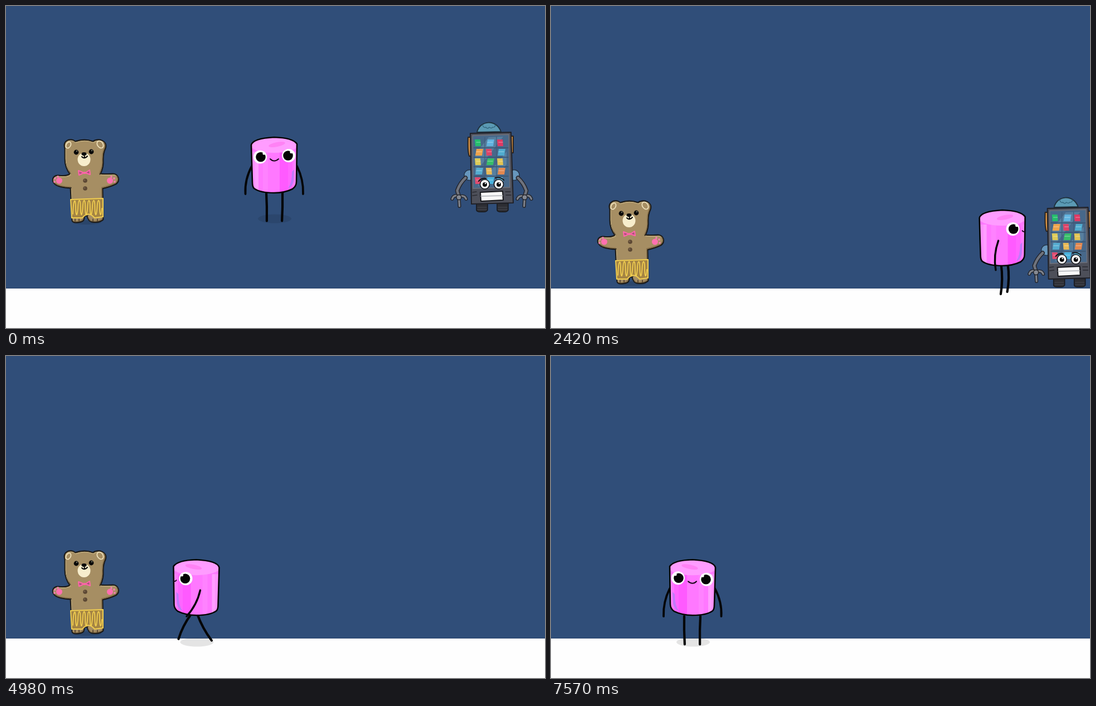
An HTML page with a canvas for the animation above (7.77 s loop, 967x579 px).

```html
<!DOCTYPE html>
<html>
<head>
<meta charset="utf-8">
<style>
  html, body { margin: 0; width: 967px; height: 579px; overflow: hidden; background: #304e79; }
  canvas { display: block; }
</style>
</head>
<body>
<canvas id="stage" width="967" height="579"></canvas>
<script>
const ctx = document.getElementById('stage').getContext('2d');
const LOOP = 7770, FLOOR = 508, GRAVITY = 568, FALL_START = 185;

// [time in ms, x] along the floor
const heroKeys = [[1691, 481], [2844, 1000], [3260, 1000], [4277, 542], [4406, 600], [5100, 288],
  [5445, 168], [5663, 266], [6000, 266], [6636, -20], [7325, 290], [7405, 254]];
const robotKeys = [[2293, 870], [2844, 1118]];
const bearKeys = [[5226, 141], [5445, 65], [6218, 65], [6636, -123]];

function follow(keys, t) {
  let dir = 1;
  if (t <= keys[0][0]) return { x: keys[0][1], dir, moving: false };
  for (let i = 1; i < keys.length; i++) {
    const [t0, x0] = keys[i - 1], [t1, x1] = keys[i];
    if (x1 !== x0) dir = Math.sign(x1 - x0);
    if (t < t1) return { x: x0 + (x1 - x0) * (t - t0) / (t1 - t0), dir, moving: x1 !== x0 };
  }
  return { x: keys[keys.length - 1][1], dir, moving: false };
}

function drop(t, distance) {
  if (t < 330) return 0;
  return Math.min(distance, GRAVITY / 2 * ((t - FALL_START) / 1000) ** 2);
}

function paint(path, fill, stroke, width = 2) {
  if (fill) { ctx.fillStyle = fill; ctx.fill(path); }
  if (stroke) { ctx.strokeStyle = stroke; ctx.lineWidth = width; ctx.stroke(path); }
}
const shape = (d, fill, stroke, width) => paint(new Path2D(d), fill, stroke, width);

function oval(x, y, rx, ry, fill, stroke, width, turn = 0) {
  const p = new Path2D();
  p.ellipse(x, y, rx, ry, turn, 0, 7);
  paint(p, fill, stroke, width);
}
const dot = (x, y, r, fill, stroke, width) => oval(x, y, r, r, fill, stroke, width);

function at(x, y, flip, draw) {
  ctx.save();
  ctx.translate(x, y);
  ctx.scale(flip, 1);
  draw();
  ctx.restore();
}

function drawBear() {
  const body = new Path2D('M-35 256C-40 241-24 237-17 244Q0 238 15 244C23 237 42 242 37 256Q33 264 33 275Q34 290 28 302' +
    'Q44 303 51 302C61 303 64 314 56 320Q46 325 32 328L33 384Q27 390 13 388Q7 387 5 377L-1 377Q0 387-7 388' +
    'Q-20 391-22 386L-25 327Q-46 326-53 320C-60 314-57 304-46 305Q-33 307-26 302Q-35 290-35 275Q-35 264-35 256Z');
  oval(4, 389, 26, 4, 'rgba(0,0,0,.12)');
  paint(body, '#a68e63', '#1c1a18', 3);
  ctx.save();
  ctx.clip(body);
  ctx.translate(1, 1.5);
  paint(body, null, '#bba576', 2);
  ctx.translate(-2, -3);
  paint(body, null, '#8a724b', 2);
  ctx.restore();
  paint(body, null, '#1c1a18', 1);

  oval(-29, 250, 4, 6, null, '#eddfb9', 1.8, .5);
  oval(28, 249, 5, 7, null, '#eddfb9', 1.8, -.6);
  dot(-15, 263, 4.4, '#080808');
  dot(12, 262, 4.4, '#080808');
  dot(-14, 261, 1.2, '#776');
  dot(13, 260, 1.2, '#776');
  oval(-1, 276, 11.5, 12, '#f7edcc');
  oval(-1, 266, 4.6, 3, '#080808');
  shape('M-1 267L0 272M-5 271Q0 276 5 270', null, '#080808', 2);

  shape('M-1 300L-11 296L-10 304ZM1 300L9 295L10 303Z', '#a7557b', '#ff65ab', 2);
  dot(0, 300, 2, '#ff65ab');
  for (const y of [314, 328]) {
    dot(1, y, 3.8, '#5b4733');
    dot(0, y - 1, 1.5, '#77614a');
  }
  for (const side of [-1, 1]) {
    oval(side * 45.5, 314, 5.5, 5.5, '#ff70b0');
    for (const [x, y] of [[48, 307], [53, 310], [54, 316]]) dot(side * x, y, 1.9, '#f17fac');
  }

  let wave = 'M-21 374';
  for (let i = 0; i < 6; i++) {
    const x = -20 + i * 8.6;
    wave += `C${x} 345 ${x + 4} 346 ${x + 4} 360S${x + 6} 384 ${x + 8} 364`;
  }
  shape('M-25 348L33 346L33 379L18 381Q10 372 4 375Q0 376-4 381L-23 381Z', '#a48443', '#f0cd50', 2);
  shape(wave, null, '#f0cd50', 1.8);
  shape('M-17 383v4M-10 383v4M15 383v4M23 383v4', null, '#4f3d28', 1.6);
}

function drawRobotArm(side) {
  at(1.5, 0, side, () => {
    dot(40, 304, 9.5, '#6797bd', '#26364a', 1.6);
    const arm = 'M47 309Q57 318 62 332L59 342';
    shape(arm, null, '#22242b', 7.5);
    shape(arm, null, '#6f737d', 4.5);
    const claw = 'M59 343Q49 339 46 347M59 343Q68 338 71 347M59 344L58 360';
    shape(claw, null, '#22242b', 6);
    shape(claw, null, '#7e828b', 3.2);
    dot(59, 344, 4.5, '#858992', '#22242b', 1.5);
  });
}

function drawRobot() {
  shape('M-41 236h9v34h-7Q-42 262-41 236ZM35 234h5v30h-5Z', '#d99445', '#2b2520', 2);
  drawRobotArm(-1);
  drawRobotArm(1);
  for (const x of [-26, 11]) {
    shape(`M${x} 355h20v12q-2 4-10 3q-9 1-10-3Z`, '#2d2e34', '#17181c', 1.5);
    shape(`M${x + 2} 362h16M${x + 2} 366h16`, null, '#494b52', 1);
  }
  shape('M-25 227C-20 205 10 203 18 226Z', '#5b9ab4', '#20323e', 2);
  shape('M-15 214q2 6 6 4q3 4 6 0q4 3 6 0q4 1 5-4', null, '#356981', 1.4);
  shape('M-37 229L36 227L40 354L-35 356Z', '#4d4f59', '#202128', 2);
  shape('M-33 233L32 231L34 326L-32 328Z', '#47688a', '#6a6e7a', 1.8);
  shape('M-4 236L22 235L-28 300V266ZM28 262V285L-8 324H-24Z', 'rgba(130,185,212,.28)');
  for (let y = 255; y < 320; y += 17) shape(`M-31 ${y}H31`, null, '#3a5471', 1.3);
  shape('M-11 236V308M10 235V308', null, '#3f5c7b', 1.2);

  const goods = ['#25bd6c', '#62b4e0', '#de3a64', '#eea34b', '#dc4468', '#50accf', '#dccb58', '#38bd69',
    '#e2c352', '#55acd0', '#e8b956', '#e38850', '#de4c70', '#48b2dd', '#58b6d8'];
  goods.forEach((color, i) => {
    const x = -28 + i % 3 * 20, y = 240 + Math.floor(i / 3) * 17;
    const w = 10 + i * 2 % 4, lean = i % 2 * 3 - 1;
    shape(`M${x + lean} ${y}h${w}l${-lean} 12h${-w}Z`, color);
    shape(`M${x + 2} ${y + 5}h${w - 3}`, null, 'rgba(255,255,255,.3)', 1.5);
  });

  for (const x of [-11, 14]) {
    dot(x, 320.5, 8.5, '#fff', '#15161a', 1.6);
    dot(x, 321, 4, '#08090c');
    dot(x + 1, 319, 1.2, '#fff');
  }
  shape('M-22 315Q-17 309-9 310M8 309Q17 307 23 313', null, '#15161a', 2.2);
  shape('M-19 335L21 333L22 349L-18 351Z', '#f7f7f7', '#17181c', 2);
  shape('M-18 342L21 341', null, '#aeb1b7', 1.4);
  shape('M-33 335l7-1M-33 341l8-1M26 334h9M27 340h9', null, '#2a2b32', 1.4);
}

function limb(x, y, length, degrees, bend, width = 4.2) {
  const a = degrees * Math.PI / 180, dx = Math.sin(a) * length, dy = Math.cos(a) * length;
  shape(`M${x} ${y}Q${x + dx / 2 + bend * dy / length} ${y + dy / 2 - bend * dx / length} ${x + dx} ${y + dy}`,
    null, '#050505', width);
}

function drawEye(x, y, shift) {
  dot(x, y, 12, '#fff');
  dot(x + shift, y, 8.8, '#050505');
  dot(x + shift + 6, y - 6.5, 2.6, '#fff');
}

function drawHeroBody() {
  const body = new Path2D('M-41 250Q-38 238 0 236Q34 237 41 248L40 316Q40 324 33 329Q19 336 0 336Q-25 336-36 328Q-39 325-39 317Z');
  ctx.save();
  ctx.clip(body);
  ctx.fillStyle = '#ff78ff';
  ctx.fillRect(-45, 230, 90, 110);
  for (const [x, w, color] of [[-41, 7, '#ff92ff'], [-34, 6, '#ff9eff'], [-20, 9, '#ff82ff'],
    [10, 15, '#ff5aff'], [25, 8, '#ff66ff'], [37, 6, '#ff8cff']]) {
    ctx.fillStyle = color;
    ctx.fillRect(x, 262, w, 78);
  }
  oval(0, 250, 43, 14, '#ff9cff');
  oval(5, 249, 15, 4, '#ff82f5', null, 0, -.2);
  shape('M36 294L35 315Q33 325 25 328Q32 318 32 298Z', '#c07bfa');
  ctx.restore();
  paint(body, null, '#050505', 2.6);
}

function drawHero(hero, t) {
  const idle = !hero.moving;
  const swing = Math.sin((t - 2420) * Math.PI / 216.7) * hero.dir;
  const breath = t < 880 ? 0 : .9 * (1 - Math.cos((t - 880) * 2 * Math.PI / 1029));
  const lift = idle ? breath : 1 + 1.5 * Math.abs(swing);
  if (idle) {
    limb(-14, 336, 50.5, 1, 1);
    limb(15, 336, 50.5, -1, 1);
  } else {
    limb(-2, 333, 53, -53 * swing, 4);
    limb(10, 333, 49, 53 * swing - 2, 4);
  }
  ctx.translate(0, -lift);
  if (idle) {
    shape('M-40 288Q-53 312-51.5 338M41 288Q53 312 52 338', null, '#050505', 3.8);
  }
  drawHeroBody();
  if (idle) {
    drawEye(-25, 271.5, 1);
    drawEye(26, 269, -1);
    shape('M-7 275Q0 282 8 275', null, '#150515', 2);
  } else {
    drawEye(19, 270, 1);
    shape('M36 273Q38 276 41 274', null, '#150515', 2);
    limb(-7, 291, 53, -6 + 62 * swing, -7, 3.4);
  }
}

function drawShadow(x, y, t) {
  const overFloor = t < 880 || (t > 2720 && t < 5100) || t > 6700;
  ctx.save();
  ctx.beginPath();
  ctx.rect(0, 0, 967, overFloor ? 579 : FLOOR);
  ctx.clip();
  oval(x + 1, y, 30, 8, 'rgba(0,0,0,.1)');
  ctx.restore();
}

function render(t) {
  ctx.fillStyle = '#304e79';
  ctx.fillRect(0, 0, 967, FLOOR);
  ctx.fillStyle = '#2a446c';
  ctx.fillRect(0, FLOOR - 1, 967, 1);
  ctx.fillStyle = '#fefefe';
  ctx.fillRect(0, FLOOR, 967, 71);

  const hero = follow(heroKeys, t);
  const heroY = drop(t, 132);
  const settle = 5 * Math.min(1, Math.max(0, (t - 890) / 150));
  at(follow(bearKeys, t).x, drop(t, 110), 1, drawBear);
  at(follow(robotKeys, t).x, drop(t, 140) - settle, 1, drawRobot);
  drawShadow(hero.x, heroY + 382.5, t);
  at(hero.x, heroY, hero.dir, () => drawHero(hero, t));
}

ctx.lineCap = ctx.lineJoin = 'round';
const start = performance.now();
function tick() {
  render((performance.now() - start) % LOOP);
  requestAnimationFrame(tick);
}
tick();
</script>
</body>
</html>
```
